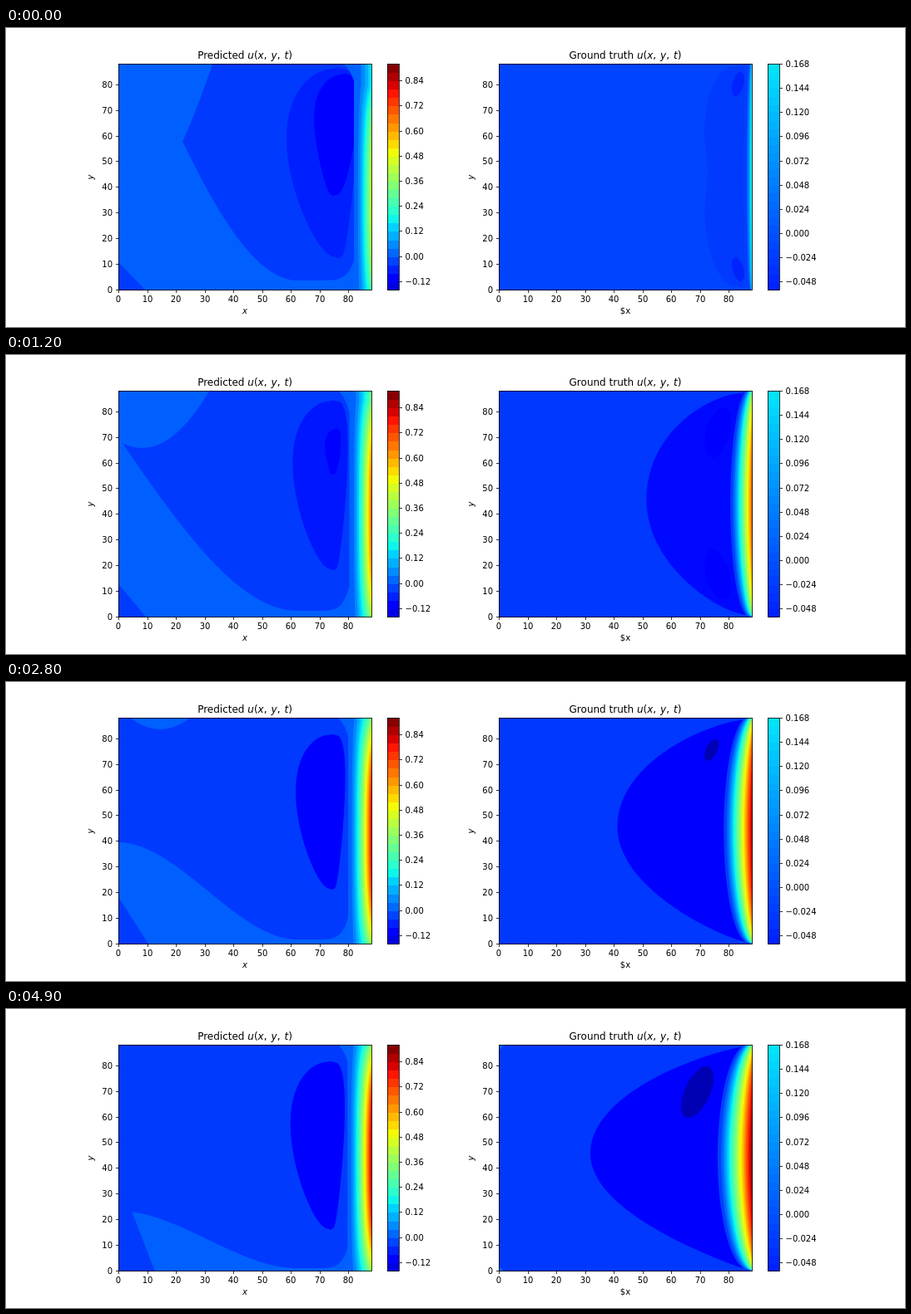
An HTML page with a canvas that plays this animation: 1080x360 px, repeating every 5 s.

```html
<!DOCTYPE html>
<html lang="en">
<head>
<meta charset="utf-8">
<title>Predicted and ground truth contours</title>
<style>
html, body { margin: 0; width: 100%; height: 100%; overflow: hidden; background: #fff; }
canvas { display: block; }
</style>
</head>
<body>
<canvas width="1080" height="360"></canvas>
<script>
const ctx = document.querySelector('canvas').getContext('2d');
const TOP = 43, BOTTOM = 315, WIDTH = 304, HEIGHT = BOTTOM - TOP;
const LEFT = 135, RIGHT = 592, LEVEL = 1 / 27;
const FONT = '"DejaVu Sans", Verdana, sans-serif';
let step = 0;

const clamp = (v, low = 0, high = 1) => Math.max(low, Math.min(high, v));
const decay = tau => Math.exp(-step / tau);

function jet(x) {
  const r = Math.min((x - .35) / .31, 1 - (x - .89) / .22);
  const g = Math.min((x - .125) * 4, (.91 - x) / .27);
  const b = Math.min(.5 + x / .22, (.65 - x) / .31);
  return `rgb(${[r, g, b].map(v => Math.round(255 * clamp(v)))})`;
}

function polygon(points, color) {
  ctx.beginPath();
  points.forEach(p => ctx.lineTo(...p));
  ctx.fillStyle = color;
  ctx.fill();
}

// Points of f(u) for u from -1 to 1.
const sweep = f => Array.from({ length: 101 }, (_, i) => f(i / 50 - 1));

// Upright lobe: wide arc on the left, steep side on the right of its axis.
function lobe(l, t, r, b, axis, lean, color) {
  const side = f => sweep(u => {
    const mid = axis - lean * u;
    return [l + (r - l) * f(u, mid, 1 - u * u), t + (b - t) * (u + 1) / 2];
  });
  const near = side((u, mid, c) => mid - mid * .96 * Math.sqrt(c) * (1 - .3 * u));
  const far = side((u, mid, c) => mid + (1 - mid) * .96 * c ** .3 * (1 - .4 * u));
  polygon([...near, ...far.reverse()], color);
}

// Sheared ellipse that exactly fills its box.
function slanted(l, t, r, b, tilt, color) {
  polygon(sweep(u => {
    const sin = Math.sin(u * Math.PI), cos = Math.cos(u * Math.PI);
    return [(l + r) / 2 + (r - l) / 2 * (Math.sqrt(1 - tilt * tilt) * cos - tilt * sin),
      (t + b) / 2 + (b - t) / 2 * sin];
  }), color);
}

// Nested contour levels rising toward the right edge of a panel.
function band(edge, center, base, power, width, peak) {
  for (let y = TOP; y <= BOTTOM; y++) {
    const u = Math.min(1, Math.abs(y + .5 - center) / (HEIGHT / 2));
    const w = width(u), rise = peak(u) - base;
    for (let k = 0; k * LEVEL < rise; k++) {
      const d = w * (1 - (k * LEVEL / rise) ** (1 / power));
      ctx.fillStyle = jet(base + (k + 1) * LEVEL);
      ctx.fillRect(edge - d, y, d + 1, 1);
    }
  }
}

function panel(x, color, draw) {
  ctx.save();
  ctx.beginPath();
  ctx.rect(x, TOP, WIDTH + 1, HEIGHT + 1);
  ctx.clip();
  ctx.fillStyle = color;
  ctx.fillRect(x, TOP, WIDTH + 1, HEIGHT + 1);
  draw();
  ctx.restore();
}

// The main level lies between a rising parabola and a sinking slope.
function mainLevel(color) {
  const end = 412 + 8 * decay(4), floor = 304 + 1.15 * Math.sqrt(step);
  const lift = Math.exp((16 - step) / 11);
  const slopeTop = 270 - 140 * Math.exp((16 - step) / 20);
  const sag = clamp((25 - step) / 7, 0, 1.5);
  const corner = x => 30 * Math.max(0, (x - 350) / (end - 350)) ** 8;
  const ceiling = x => Math.max(39 + corner(x),
    40 + 50 * lift - .0105 * (x - 192 + 20 * lift) ** 2);
  const slope = x => {
    const f = Math.min(1, (x - LEFT) / 215);
    const h = f * f * (3 - 2 * f) + sag * f * (1 - f) ** 2;
    return slopeTop + (floor - slopeTop) * h - corner(x);
  };
  const xs = sweep(u => LEFT + (end - LEFT) * (u + 1) / 2);
  polygon([...xs.map(x => [x, ceiling(x)]),
    ...xs.reverse().map(x => [x, Math.max(slope(x), ceiling(x))])], color);

  const foot = 168 + 11 * (step / 49) ** 2;
  polygon([[foot, BOTTOM + 1], [LEFT, BOTTOM - (foot - LEFT) / (1 - .0125 * step)],
    [LEFT, BOTTOM + 1]], color);
}

function predicted() {
  mainLevel(jet(.182));

  // The lobes grow steadily, then start over as one darker lobe.
  const merged = step >= 28, age = merged ? step - 28 : step;
  const early = decay(2), slow = decay(9), k = decay(14);
  lobe(348 - .3 * age - 11 * early, merged ? 63 : 57 - 9 * slow, 406 + 14 * slow,
    250 + .75 * age + 27 * early, .75, 0, jet(merged ? .125 : .147 + .008 * early));
  if (!merged) lobe(388 - .4 * step - 18 * early, 87 + .15 * step - 32 * early,
    408 - .5 * step + 12 * early, 135 + .75 * step + 67 * early, .61, .15, jet(.125));

  const low = .52 - .18 * slow, high = .94 - .37 * k;
  band(LEFT + WIDTH, 180 + 25 * k, .185, 1.6, () => 29 - 8 * k,
    u => low + (high - low) * (1 - u ** 2.5));
}

function truth() {
  const grow = Math.sqrt(step), early = decay(3);
  const tip = 835 - 19 * grow, bend = .35 + .6 * (step / 49) ** .35;
  polygon(sweep(u => {
    const c = 1 - u * u, q = u < 0 ? bend * .85 : bend;
    return [tip + (888 - tip) * (1 - c ** q) + 8 * early * Math.exp(-((u / .3) ** 2)),
      179 + 134 * u - 5 * c];
  }), jet(.122 + .06 * decay(7)));

  if (step < 13) {
    const g = grow / 3, tone = jet(.11 + .05 * early);
    const l = 872 - 28 * g, t = 53 + 9 * g, r = 887 - 14 * g, b = 82 + 36 * g;
    slanted(l, t, r, b, .4, tone);
    slanted(l, 358 - t, r, 358 - b, .4, tone);
  }
  if (step > 20) {
    const g = Math.sqrt((step - 20) / 29);
    slanted(870 - 59 * g, 69, 863 - 13 * g, 55 + 76 * g, .55, jet(.045));
  }

  const notch = .2 * Math.max(0, step - 15);
  for (const [y, way] of [[TOP, 1], [BOTTOM + 1, -1]])
    polygon([[RIGHT, y], [RIGHT + notch, y], [RIGHT, y + way * notch]], jet(.22));

  const high = .97 - .59 * decay(10), arch = u => 1 - u * u;
  band(RIGHT + WIDTH, 178, .15, 1.35 + .85 * early,
    u => 4 + (11 + 4.3 * grow - 4) * arch(u) ** .5,
    u => .3 + (high - .3) * arch(u) ** .35);
}

function text(str, x, y, align = 'center', style = '10px') {
  ctx.font = `${style} ${FONT}`;
  ctx.textAlign = align;
  ctx.fillStyle = '#000';
  ctx.fillText(str, x, y);
}

function line(x1, y1, x2, y2) {
  ctx.beginPath();
  ctx.moveTo(x1, y1);
  ctx.lineTo(x2, y2);
  ctx.stroke();
}

// Parts alternate between upright and italic.
function title(name, center) {
  const parts = [name + ' ', 'u', '(', 'x', ',\u00a0', 'y', ',\u00a0', 't', ')'];
  const fonts = parts.map((p, i) => i % 2 ? 'italic 12px' : '12px');
  const widths = parts.map((p, i) => {
    ctx.font = `${fonts[i]} ${FONT}`;
    return ctx.measureText(p).width + (p[0] === ',' ? 1.2 : 0);
  });
  let x = center - widths.reduce((a, b) => a + b) / 2;
  parts.forEach((p, i) => {
    text(p, x, 37, 'left', fonts[i]);
    x += widths[i];
  });
}

function axes(x0, name, xLabel, xStyle) {
  ctx.strokeStyle = '#000';
  ctx.lineWidth = .8;
  ctx.strokeRect(x0 + .5, TOP + .5, WIDTH, HEIGHT);
  for (let v = 0; v <= 80; v += 10) {
    const x = Math.round(x0 + v * WIDTH / 88) + .5, y = Math.round(BOTTOM - v * HEIGHT / 88) + .5;
    line(x, BOTTOM + .5, x, BOTTOM + 4);
    line(x0 + .5, y, x0 - 3, y);
    text(v, x - .5, 330);
    text(v, x0 - 7, y + 3.3, 'right');
  }
  title(name, x0 + WIDTH / 2);
  text(xLabel, x0 + WIDTH / 2, 344, 'center', xStyle);
  ctx.save();
  ctx.translate(x0 - 30, 179.5);
  ctx.rotate(-Math.PI / 2);
  text('y', 0, 0, 'center', 'italic 10px');
  ctx.restore();
}

function colorbar(x, cells, low, high, first, gap, digits) {
  const h = HEIGHT / cells;
  for (let k = 0; k < cells; k++) {
    ctx.fillStyle = jet(low + (high - low) * (k + .5) / cells);
    const y = Math.round(BOTTOM - (k + 1) * h);
    ctx.fillRect(x, y, 14, Math.round(BOTTOM - k * h) - y + 1);
  }
  ctx.strokeRect(x + .5, TOP + .5, 14, HEIGHT);
  for (let k = 1, v = first; k <= cells; k += 3, v += gap) {
    const y = Math.round(BOTTOM - k * h) + .5;
    line(x + 14.5, y, x + 18, y);
    const sign = v < -1e-9 ? '\u2212' : '';
    text(sign + Math.abs(v).toFixed(digits), x + 21.5, y + 3.3, 'left');
  }
}

function frame(now) {
  step = Math.floor(now / 100) % 50;
  ctx.fillStyle = '#fff';
  ctx.fillRect(0, 0, 1080, 360);
  panel(LEFT, jet(.219), predicted);
  panel(RIGHT, jet(.18 + .012 * decay(3)), truth);
  axes(LEFT, 'Predicted', 'x', 'italic 10px');
  axes(RIGHT, 'Ground truth', '$x', '10px');
  colorbar(458, 27, .07, 1.01, -.12, .12, 2);
  colorbar(915, 28, .155, .352, -.048, .024, 3);
}

const start = performance.now();
(function loop() {
  frame(Math.max(0, performance.now() - start));
  requestAnimationFrame(loop);
})();
</script>
</body>
</html>
```
